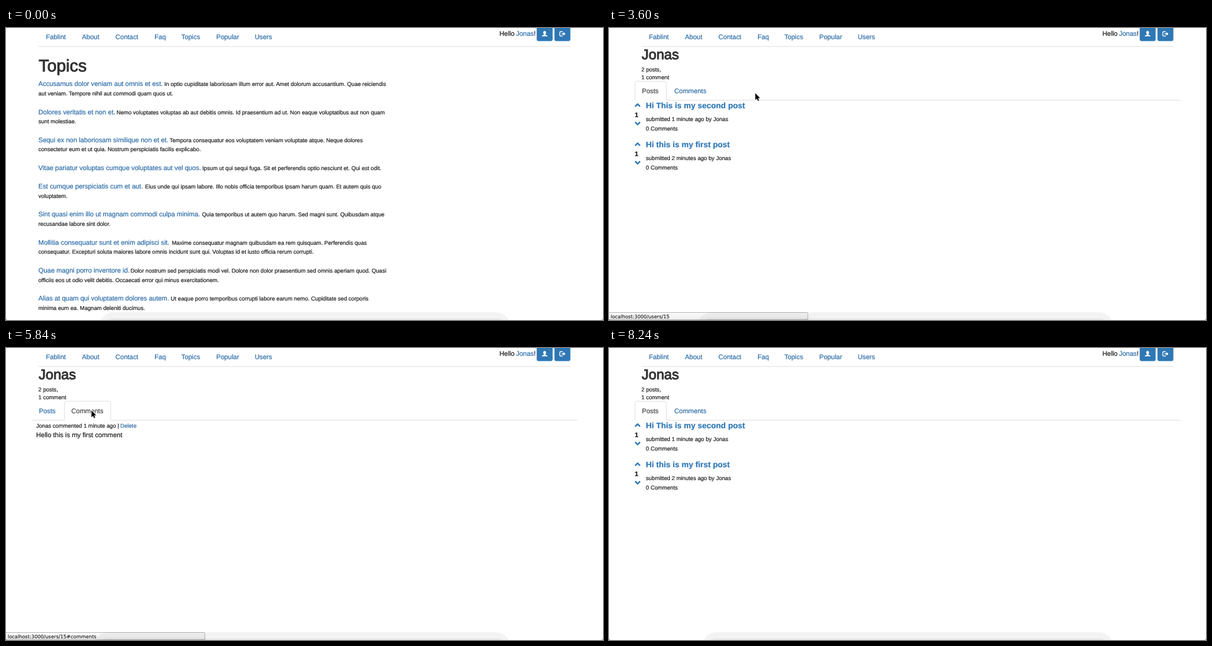
These frames come from a looping animation (1069x524 px, 8.32 s). An HTML page with a canvas:

```html
<!DOCTYPE html>
<html lang="en">
<head>
<meta charset="utf-8">
<title>Profile tabs</title>
<style>
html, body { margin: 0; width: 100%; height: 100%; overflow: hidden; background: #fff; }
canvas { display: block; }
</style>
</head>
<body>
<canvas id="stage" width="1069" height="524"></canvas>
<script>
const ctx = document.getElementById('stage').getContext('2d');
const LOOP = 8320, STEP = 80;
const SANS = '"Liberation Sans", Arial, sans-serif';
const STATUS_FONT = '"DejaVu Sans", sans-serif';
const BODY = 11.87, SMALL = 10.06;
const INK = '#1c1c1c', HEAD = '#333', LINK = '#2a6ba8', HOVER = '#23527c', BLUE = '#2f78b5', LINE = '#ddd';
const USER = 'Jonas';

const NAV = [['Fablint', 71.5], ['About', 136], ['Contact', 196], ['Faq', 266], ['Topics', 314], ['Popular', 376.5], ['Users', 445.5]];

// link, x of the description, description lines
const TOPICS = [
  ['Accusamus dolor veniam aut omnis et est.', 283.5, 'In optio cupiditate laboriosam illum error aut. Amet dolorum accusantium. Quae reiciendis', 'aut veniam. Tempore nihil aut commodi quam quos ut.'],
  ['Dolores veritatis et non et.', 198, 'Nemo voluptates voluptas ab aut debitis omnis. Id praesentium ad ut. Non eaque voluptatibus aut non quam', 'sunt molestiae.'],
  ['Sequi ex non laboriosam similique non et et.', 293, 'Tempora consequatur eos voluptatem veniam voluptate atque. Neque dolores', 'consectetur eum et ut quia. Nostrum perspiciatis facilis explicabo.'],
  ['Vitae pariatur voluptas cumque voluptates aut vel quos.', 351.5, 'Ipsum ut qui sequi fuga. Sit et perferendis optio nesciunt et. Qui est odit.'],
  ['Est cumque perspiciatis cum et aut.', 249, 'Eius unde qui ipsam labore. Illo nobis officia temporibus ipsam harum quam. Et autem quis quo', 'voluptatem.'],
  ['Sint quasi enim illo ut magnam commodi culpa minima.', 351, 'Quia temporibus ut autem quo harum. Sed magni sunt. Quibusdam atque', 'recusandae labore sint dolor.'],
  ['Mollitia consequatur sunt et enim adipisci sit.', 297, 'Maxime consequatur magnam quibusdam ea rem quisquam. Perferendis quas', 'consequatur. Excepturi soluta maiores labore omnis incidunt sunt qui. Voluptas id et iusto officia rerum corrupti.'],
  ['Quae magni porro inventore id.', 223, 'Dolor nostrum sed perspiciatis modi vel. Dolore non dolor praesentium sed omnis aperiam quod. Quasi', 'officiis eos ut odio velit debitis. Occaecati error qui minus exercitationem.'],
  ['Alias at quam qui voluptatem dolores autem.', 295, 'Ut eaque porro temporibus corrupti labore earum nemo. Cupiditate sed corporis', 'minima eum ea. Magnam deleniti ducimus.']
];

// time, x, y of the pointer tip
const PATH = [
  [80, 610, 530], [560, 760, 230], [640, 760, 230], [1120, 878, 47], [1200, 879, 48], [1280, 879, 48],
  [2000, 930, 12], [3280, 930, 12], [3600, 262, 117], [4160, 165, 115], [4400, 153, 112],
  [6080, 153, 112], [6480, 97, 110.5], [6880, 97, 110.5], [7200, 330, 270], [7280, 330, 270], [7840, 560, 535]
];

const ARROW = new Path2D('M0 0V12.2L2.8 9.6L4.6 13.8L6.7 12.9L4.9 8.8H8.6Z');
const HAND = new Path2D('M-1.4 1Q0 -.7 1.4 1V5Q3 4.1 4 5.3Q5.6 4.7 6.3 6Q8 5.7 8.1 7.5L7.8 10.5Q7.4 12 6.7 13V14.6H-.8V13Q-3 10.6 -4.5 8.1Q-4 6 -1.4 8.2Z');
const FINGERS = new Path2D('M1.4 9V12M3.4 9V12M5.4 9V12');
const PERSON = new Path2D('M0 -5C2.1 -5 2.7 -3.3 2.5 -1.6C2.3 -.2 1.6 .6 1.3 1V1.7C2.6 2.3 5 2.8 5.2 4.6H-5.2C-5 2.8 -2.6 2.3 -1.3 1.7V1C-1.6 .6 -2.3 -.2 -2.5 -1.6C-2.7 -3.3 -2.1 -5 0 -5Z');
const DOOR = new Path2D('M1 -3.9H-2.8Q-4.4 -3.9 -4.4 -2.3V2.3Q-4.4 3.9 -2.8 3.9H1');
const EXIT = new Path2D('M-1.5 -1.1H1.5V-3.2L5.4 0L1.5 3.2V1.1H-1.5Z');
const CHEVRON = new Path2D('M-4.4 2.2L0 -2.2L4.4 2.2');

// A thin outline thickens the letters like soft font smoothing
function text(s, x, y, size = SMALL, color = INK, { weight = '', font = SANS, outline = 0.22 } = {}) {
  ctx.font = `${weight} ${size}px ${font}`;
  ctx.fillStyle = ctx.strokeStyle = color;
  ctx.lineWidth = outline;
  ctx.fillText(s, x, y);
  ctx.strokeText(s, x, y);
}

function heading(s, x, y, size) {
  text(s, x, y, size, HEAD, { outline: 1.1 });
}

function box(x, y, w, h, r, fill, stroke) {
  ctx.beginPath();
  ctx.roundRect(x, y, w, h, r);
  if (fill) { ctx.fillStyle = fill; ctx.fill(); }
  if (stroke) { ctx.strokeStyle = stroke; ctx.lineWidth = 1; ctx.stroke(); }
}

function rule(x1, x2, y) {
  ctx.fillStyle = LINE;
  ctx.fillRect(x1, y, x2 - x1, 1);
}

function shape(path, x, y, fill, stroke, width = 1, flip = 1) {
  ctx.save();
  ctx.translate(x, y);
  ctx.scale(1, flip);
  if (stroke) { ctx.strokeStyle = stroke; ctx.lineWidth = width; ctx.stroke(path); }
  if (fill) { ctx.fillStyle = fill; ctx.fill(path); }
  ctx.restore();
}

function pointerAt(t) {
  const i = PATH.findIndex(k => k[0] > t);
  if (i < 1) return null;
  const [t0, x0, y0] = PATH[i - 1], [t1, x1, y1] = PATH[i];
  const u = (t - t0) / (t1 - t0), e = u * u * (3 - 2 * u);
  return { x: x0 + (x1 - x0) * e, y: y0 + (y1 - y0) * e };
}

function drawHeader(hover) {
  for (const [label, x] of NAV) text(label, x, 20, BODY, LINK);
  text('Hello', 883.5, 14, BODY);
  text(USER, 913.3, 14, BODY, hover ? HOVER : LINK);
  text('!', 945, 14, BODY);
  if (hover) {
    ctx.fillStyle = HOVER;
    ctx.fillRect(914, 15, 31, 1);
  }
  for (const x of [950.3, 982.1]) box(x, -8, 28.5, 31.4, 3.5, BLUE);
  shape(PERSON, 964.5, 10.3, '#fff');
  shape(DOOR, 996, 10.5, null, '#fff', 1.5);
  shape(EXIT, 996.5, 10.5, '#fff');
  rule(58, 1010.5, 32.6);
}

function drawTopics() {
  heading('Topics', 58.5, 77.7, 30.3);
  let y = 104.4;
  for (const [link, x, ...lines] of TOPICS) {
    text(link, 58, y, BODY, LINK);
    lines.forEach((line, i) => text(line, i ? 58 : x, y + i * 16.72));
    y += (lines.length + 1) * 16.72;
  }
}

function drawTab(label, x, w, active, hover) {
  if (active) {
    box(x + 0.5, 95.5, w - 1, 40, 3.5, '#fff', LINE);
    ctx.fillStyle = '#fff';
    ctx.fillRect(x - 1, 130, w + 2, 8);
  } else if (hover) {
    box(x, 95.5, w, 33.7, [3.5, 3.5, 0, 0], '#ececec');
  }
  text(label, x + 13, 117, BODY, active ? '#444' : hover ? HOVER : LINK);
}

function drawPost(title, age, y) {
  shape(CHEVRON, 51.2, y + 0.3, null, BLUE, 2.6);
  shape(CHEVRON, 51.2, y + 32.7, null, BLUE, 2.6, -1);
  text('1', 46, y + 21.5, BODY, INK, { weight: 'bold' });
  text(title, 66, y + 5.2, 14.4, BLUE, { weight: 'bold' });
  text(`submitted ${age} ago by ${USER}`, 66, y + 28.6);
  text('0 Comments', 66, y + 45.6);
}

function drawProfile(showComments, overPosts, overComments) {
  heading(USER, 58.5, 56, 25);
  text('2 posts,', 58, 77.8);
  text('1 comment', 58, 92);
  rule(46, 1023, 129.2);
  drawTab('Posts', 46, 57, !showComments, overPosts);
  drawTab('Comments', 104, 84, showComments, overComments);
  if (showComments) {
    text(`${USER} commented 1 minute ago |`, 54, 143);
    text('Delete', 204.7, 143, SMALL, LINK);
    text('Hello this is my first comment', 54, 159.6, BODY);
  } else {
    drawPost('Hi This is my second post', '1 minute', 138.4);
    drawPost('Hi this is my first post', '2 minutes', 208.6);
  }
}

function drawBottom(status) {
  if (status) {
    const fade = ctx.createLinearGradient(0, 510, 0, 524);
    fade.addColorStop(0, '#fbfbfb');
    fade.addColorStop(1, '#eee');
    box(-0.5, 510.5, 356.5, 13, [0, 2, 0, 0], fade, '#b0b0b0');
  }
  const left = status ? 158 : 167, shade = 'rgba(0,0,0,.047)';
  box(left, 510, 903 - left, 60, 26, shade);
  box(left + 11, 521, 881 - left, 40, 12, shade);
  if (status) text(status, 3, 520.7, 8.78, '#111', { font: STATUS_FONT, outline: 0.1 });
  ctx.fillStyle = '#222';
  ctx.fillRect(0, 523, 1, 1);
  ctx.fillRect(1068, 523, 1, 1);
}

function statusAt(t) {
  const base = 'localhost:3000/users/15';
  if (t < 1840 || t >= 7200) return '';
  if (t < 4080) return base;
  return base + (t < 6320 ? '#comments' : '#posts');
}

function drawPointer(p, hand, click) {
  if (!hand) {
    shape(ARROW, p.x, p.y, '#000', '#fff', 1.8);
    return;
  }
  shape(HAND, p.x, p.y, '#fff', '#111', 2);
  shape(FINGERS, p.x, p.y, null, '#333', 0.8);
  if (click) {
    ctx.beginPath();
    ctx.arc(p.x + 1.5, p.y + 6.5, 13.7, 0, Math.PI * 2);
    ctx.strokeStyle = '#222';
    ctx.lineWidth = 1;
    ctx.stroke();
  }
}

function render(t) {
  const profile = t >= 3360, comments = t >= 5120 && t < 6640;
  const p = pointerAt(t);
  const over = (x1, x2, y1, y2) => !!p && p.x >= x1 && p.x < x2 && p.y >= y1 && p.y < y2;
  const overUser = over(914, 946, 2, 18);
  const overPosts = profile && comments && over(46, 103, 95, 129);
  const overComments = profile && !comments && over(104, 188, 95, 129);
  ctx.fillStyle = '#fff';
  ctx.fillRect(0, 0, 1069, 524);
  drawHeader(overUser);
  if (profile) drawProfile(comments, overPosts, overComments);
  else drawTopics();
  drawBottom(statusAt(t));
  if (p) drawPointer(p, overUser || overPosts || overComments, t === 5040 || t === 6560);
}

ctx.textRendering = 'geometricPrecision';
ctx.lineJoin = 'round';
const start = performance.now();
function tick() {
  const t = (performance.now() - start) % LOOP;
  render(Math.floor(t / STEP) * STEP);
  requestAnimationFrame(tick);
}
tick();
</script>
</body>
</html>
```
